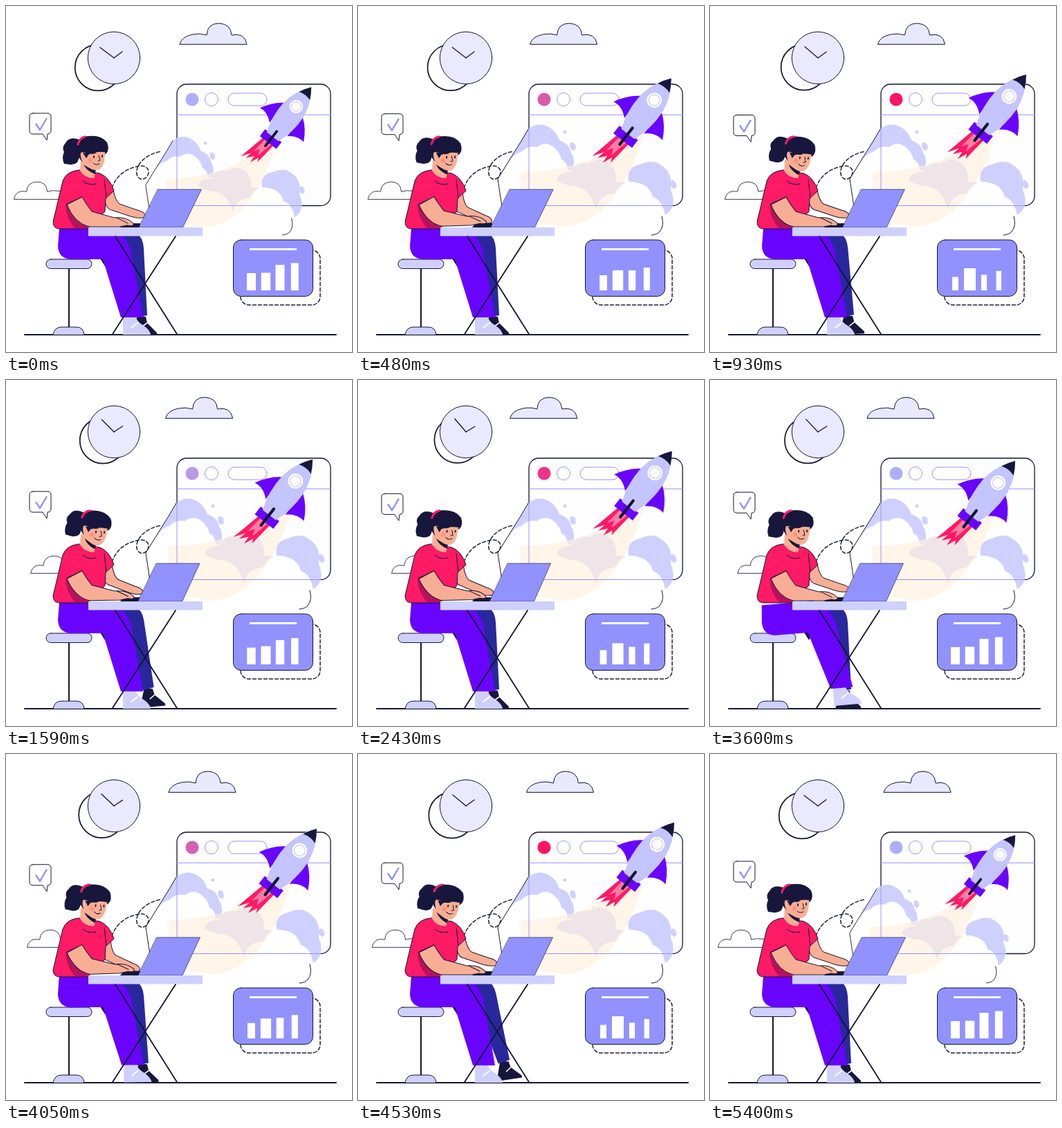
An HTML page for the animation above (5460 ms loop, 500 by 500 pixels).

```html
<!DOCTYPE html>
<html lang="en">
<head>
<meta charset="utf-8">
<title>Rocket launch workspace</title>
<style>
  html, body { margin: 0; width: 100%; height: 100%; overflow: hidden; background: #fff; }
  svg { display: block; width: 100vw; height: 100vh; }
  .ink { stroke: #141432; stroke-width: 1; }
  .none { fill: none; }
  .lilac { fill: #d0d0ff; }
  .blue { fill: #9292ff; }
  .violet { fill: #6804ff; }
  .navy { fill: #17173d; }
  .white { fill: #fff; }
  .skin { fill: #f8ae94; }
  .pink { fill: #ff1a66; }
  .thin { fill: none; stroke: #9a94fa; stroke-width: 1; }
  .dash { fill: none; stroke: #202040; stroke-width: 1.5; stroke-dasharray: 5 3; }
</style>
</head>
<body>
<svg viewBox="0 0 500 500" stroke-linejoin="round" stroke-linecap="round">
  <defs>
    <path id="puff" d="M0 0Q3-11 19-14Q30-16 39-13Q40-30 57-30Q74-29 75-13Q94-17 97 0Z"/>
    <path id="silhouette" d="M208 300L202 250Q208 240 213 232L236 195L246 178Q262 165 279 177Q288 184 291 194Q305 198 308 212Q314 220 311 235L390 258Q388 235 405 230Q430 218 447 238Q455 250 452 266Q460 285 450 297Q445 303 437 304Q443 318 436 326Q431 331 424 331H208Z"/>
    <clipPath id="smokeClip"><use id="clipShape" href="#silhouette"/></clipPath>
  </defs>

  <!-- sky and clock -->
  <use id="topCloud" href="#puff" class="ink" fill="#e8e8ff"/>
  <use id="sideCloud" href="#puff" class="ink white"/>
  <circle id="clockRim" cx="133" cy="89" r="33.3" class="ink none" style="stroke-width:1.7"/>
  <circle cx="156" cy="75" r="37.7" class="ink" fill="#e9e9ff"/>
  <path id="minute" d="M156 75L136 60" class="ink" style="stroke-width:1.3"/>
  <path id="hour" d="M156 75L168 66" class="ink" style="stroke-width:1.3"/>
  <g id="bubble">
    <path class="ink white" d="M39 155H60Q65 155 65 160V180Q65 185 60 185L59 194L53 185H39Q34 185 34 180V160Q34 155 39 155Z"/>
    <path d="M43 170L49 179L59 162" fill="none" stroke="#9292ff" stroke-width="2.4" stroke-linecap="butt"/>
  </g>
  <path class="dash" d="M153 263Q162 238 189 232C202 228 209 237 205 244C201 253 191 252 189 243C187 230 200 215 224 210"/>

  <!-- browser window -->
  <rect x="247" y="113" width="222" height="175.5" rx="14" class="ink" fill="#fefefe" style="stroke-width:1.3"/>
  <path class="thin" d="M247 157.3H469"/>
  <circle id="dot" cx="269" cy="135" r="9.5"/>
  <circle cx="297" cy="135" r="9.5" class="thin"/>
  <rect x="321" y="126" width="56" height="18" rx="9" class="thin"/>

  <g id="smoke">
    <use href="#silhouette" class="white"/>
    <path class="lilac" d="M208 240L213 232L236 195L246 178Q262 165 279 177Q288 184 291 194Q305 198 308 212Q314 220 311 236L298 240L236 240Z"/>
    <path class="white" d="M204 250L211 236Q222 214 236 211Q246 201 258 204Q272 194 284 205Q292 212 294 222Q304 226 303 241L240 275Z"/>
    <path class="lilac" d="M287 252Q290 239 308 240Q314 224 335 227Q352 215 367 231Q374 239 373 254Q380 253 392 258Q385 233 408 229Q430 218 447 238Q455 250 452 266Q460 285 450 297Q445 303 437 304L345 298Q338 266 316 261Q300 260 287 252Z"/>
    <path class="white" d="M343 298Q348 271 371 271Q382 249 402 255Q421 258 426 276Q440 280 444 303Q442 330 424 331H330Z"/>
    <path d="M372 202Q322 238 235 240V300Q264 318 300 318Q374 312 412 188L398 176Z" fill="#fff0dd" opacity=".66"/>
    <g class="lilac">
      <circle cx="299" cy="182" r="2.6"/><circle cx="429" cy="229" r="3.7"/>
      <ellipse cx="310.5" cy="203" rx="4" ry="6.2" transform="rotate(-18 310 203)"/>
      <ellipse cx="456" cy="258" rx="4" ry="6.2" transform="rotate(-18 456 258)"/>
    </g>
    <path class="ink none" d="M208 290L202 250Q208 240 213 232L236 195L246 178M439 304Q443 318 436 326Q431 331 424 331"/>
  </g>
  <g clip-path="url(#smokeClip)">
    <rect x="247" y="113" width="222" height="175.5" rx="14" class="thin"/>
  </g>

  <g id="rocket">
    <path class="pink" d="M-11 112L-21 159L-11 144L-13 156L-4 145L-3 157L3 143L6 150L10 112Z"/>
    <path d="M-7 113L-10 140L-4 131L0 141L6 113Z" fill="#ff7ca4"/>
    <path class="violet" d="M-19 47Q-35 58-45 78Q-31 75-18 87ZM19 47Q35 58 45 78Q31 75 18 87Z"/>
    <rect x="-17" y="100" width="34" height="14" class="violet"/>
    <path d="M0 0Q17 21 20 48Q22 76 12 102H-12Q-22 76-20 48Q-17 21 0 0Z" fill="#c4c4ff"/>
    <path class="navy" d="M0 0Q7 9 11 18Q0 14-11 18Q-7 9 0 0Z"/>
    <circle cy="40" r="10.8" class="white"/>
    <circle cy="40" r="7.8" fill="none" stroke="#b8b0e8" stroke-dasharray="2 1.5"/>
    <path d="M0 91V121" stroke="#141432" stroke-width="4.2"/>
  </g>

  <!-- bar chart -->
  <rect x="339" y="353" width="115" height="79" rx="12" class="dash"/>
  <rect x="328.5" y="338" width="115" height="81.5" rx="11" class="ink blue"/>
  <path d="M352 350H420V353H352Z" class="white"/>
  <g id="bars" class="white"></g>

  <!-- stool and floor -->
  <path class="ink" style="stroke-width:2" d="M27 475H477M91 380V465"/>
  <path class="ink lilac" d="M68 475Q70 464 80 464H102Q112 464 113 475Z"/>
  <rect x="58" y="366" width="66" height="13.5" rx="6.7" class="ink lilac"/>

  <!-- woman -->
  <g id="backLeg">
    <path class="navy" d="M190 447L202 449L204 458L218 472V475H181Z"/>
    <path d="M197 463L204 458" stroke="#fff" stroke-width="1.6"/>
    <path d="M150 328H188Q198 334 199 350L204 447L187 450L165 352Z" fill="#28289c"/>
  </g>
  <path class="navy" d="M136 365H149L143 376Z"/>
  <g id="frontLeg">
    <path d="M169 448H187Q189 456 199 462Q208 468 209 475H169Z" fill="#d0d0ff"/>
    <path d="M181 465L190 458" stroke="#fff" stroke-width="2"/>
    <path class="violet" d="M77 321H150Q176 330 182 360L198 450H166L140 366H92Q76 364 75 347Z"/>
  </g>
  <g id="backArm">
    <path class="skin ink" d="M142 275L155 266Q158 281 164 286L190 295Q203 298 201 305Q193 308 180 304L150 294Q143 291 142 275Z"/>
  </g>
  <path class="pink ink" d="M105 237Q87 239 82 253L68 312Q68 322 78 322H118L143 297L144 278L156 267Q150 248 136 242Z"/>
  <path d="M90 286L86 286Q87 308 100 321H119Z" fill="#b7125c"/>
  <path class="ink none" d="M88 286L110 276M142 251L145 277M111 253Q119 260 130 257"/>
  <path class="skin" d="M108 222L107 238Q114 249 127 249Q130 243 128 232Z"/>
  <g id="head">
    <path class="navy" d="M106 193Q91 188 86 198Q80 204 84 211Q80 219 84 228L92 229Q98 230 103 226Q107 219 106 206Z"/>
    <path class="navy" d="M101 204Q104 188 120 188Q137 186 146 197Q150 207 145 213L126 222L110 225Q101 216 101 204Z"/>
    <path class="navy" d="M112 224L130 234L129 243Q118 239 113 231Z"/>
    <path class="skin" d="M108 212Q113 210 117 214Q124 207 143 211Q143 226 139 232Q134 240 124 236L113 230Q106 218 108 212Z"/>
    <path class="navy" d="M111 212Q120 214 126 206L144 207L142 211Q130 210 119 215L116 220Z"/>
    <path d="M104 200Q106 191 114 189" fill="none" stroke="#ff1a66" stroke-width="3.2"/>
    <circle cx="122" cy="223" r="3.2" fill="#ff8068" opacity=".55"/>
    <path class="ink none" d="M134 216L136 223L133 224M126 227Q130 231 135 228"/>
    <path class="none" stroke="#141432" stroke-width="1.8" d="M127 217V219M139 216V218M124 213L129 212"/>
  </g>
  <path class="navy" d="M170 314H194V320H165Z"/>
  <g id="frontArm">
    <path class="skin ink" d="M88 287L110 276Q116 287 124 297L157 306Q174 304 184 314Q186 319 175 317L164 319H120Q99 314 88 287Z"/>
    <path class="ink none" d="M160 306L176 314"/>
  </g>

  <!-- desk -->
  <path id="laptop" class="ink blue" style="stroke-width:.6"/>
  <rect x="119" y="320" width="165" height="12.5" class="lilac"/>
  <path class="ink" style="stroke-width:1.8" d="M158 333L247 474M245 333L154 474"/>
</svg>

<script>
const LOOP = 5460, CYCLE = 5400, PULSE = 1800, STEP = 30;
const get = id => document.getElementById(id);
const place = (id, value) => get(id).setAttribute('transform', value);
const mix = (a, b, p) => a + (b - a) * p;
const wave = (t, period) => (1 - Math.cos(2 * Math.PI * t / period)) / 2;
const bump = (t, from, to) => t > from && t < to ? wave(t - from, to - from) : 0;

// Eases between [time, value] pairs.
function keys(t, list) {
  for (let i = 1; i < list.length; i++) {
    const [t0, a] = list[i - 1], [t1, b] = list[i];
    if (t <= t1) return mix(a, b, wave(t - t0, 2 * (t1 - t0)));
  }
  return list[list.length - 1][1];
}

// Centre, then resting and pulsed width and height.
const bars = [
  [354.5, 13, 9, 25, 19.5],
  [375.5, 13.5, 17, 25.5, 32],
  [396, 13, 8.2, 37, 22.5],
  [417.3, 11, 7.4, 39.5, 28]
].map(([x, w0, w1, h0, h1]) => {
  const rect = document.createElementNS('http://www.w3.org/2000/svg', 'rect');
  get('bars').append(rect);
  return p => {
    const w = mix(w0, w1, p), h = mix(h0, h1, p);
    Object.entries({ x: x - w / 2, y: 411 - h, width: w, height: h })
      .forEach(([name, value]) => rect.setAttribute(name, value));
  };
});

function draw(t) {
  const drift = wave(t, CYCLE);
  const pulse = wave(t, PULSE);
  const typing = wave(t, 900);

  place('topCloud', `translate(${251 - 32 * drift} 55)`);
  place('sideCloud', `translate(${92 + 38 * drift} 279) scale(-.83 .83)`);
  place('clockRim', `translate(${11 * drift} ${-2.5 * drift})`);
  place('minute', `rotate(${13 * drift} 156 75)`);
  place('hour', `rotate(${6 * drift} 156 75)`);
  place('bubble', `translate(0 ${9.5 * drift})`);

  const scale = keys(t, [[0, .89], [420, 1], [5050, 1], [CYCLE, .89]]);
  const zoom = `translate(200 330) scale(${scale}) translate(-200 -330)`;
  const boost = keys(t, [[0, 1], [600, 0], [4530, 0], [5050, 1], [CYCLE, 1]]);
  place('smoke', zoom);
  place('clipShape', zoom);
  place('rocket', `${zoom} translate(${441 + 16 * pulse + 30 * boost} ${117 - 18 * pulse - 26 * boost}) rotate(38)`);

  const dot = [[174, 255], [174, 20], [255, 102]].map(([a, b]) => Math.round(mix(a, b, pulse)));
  get('dot').setAttribute('fill', `rgb(${dot})`);
  bars.forEach(bar => bar(pulse));

  const nod = keys(t, [[0, 0], [1200, 8.8], [3200, 1.8], [4530, 8.5], [CYCLE, 0]]);
  place('head', `rotate(${nod} 118 240)`);
  place('backArm', `translate(${-5 * typing} ${3 * typing}) rotate(${6 * typing} 148 278)`);
  place('frontArm', `rotate(${-2 * typing} 98 284)`);

  const backKick = bump(t, 720, 1950) + bump(t, 3900, 5200);
  place('backLeg', `rotate(${-8.7 * backKick} 178 345)`);
  place('frontLeg', `rotate(${-5 * bump(t, 2900, 4200)} 128 350)`);

  const lean = 4 * drift;
  get('laptop').setAttribute('d',
    `M${219.5 - lean * .8} 265H${282.5 - lean}L${255.5 - lean * .3} 320H${192 - lean * .5}Z`);
}

let start;
function frame(now) {
  start ??= now;
  const t = Math.floor(((now - start) % LOOP) / STEP) * STEP;
  draw(Math.min(t, CYCLE));
  requestAnimationFrame(frame);
}
draw(0);
requestAnimationFrame(frame);
</script>
</body>
</html>
```
